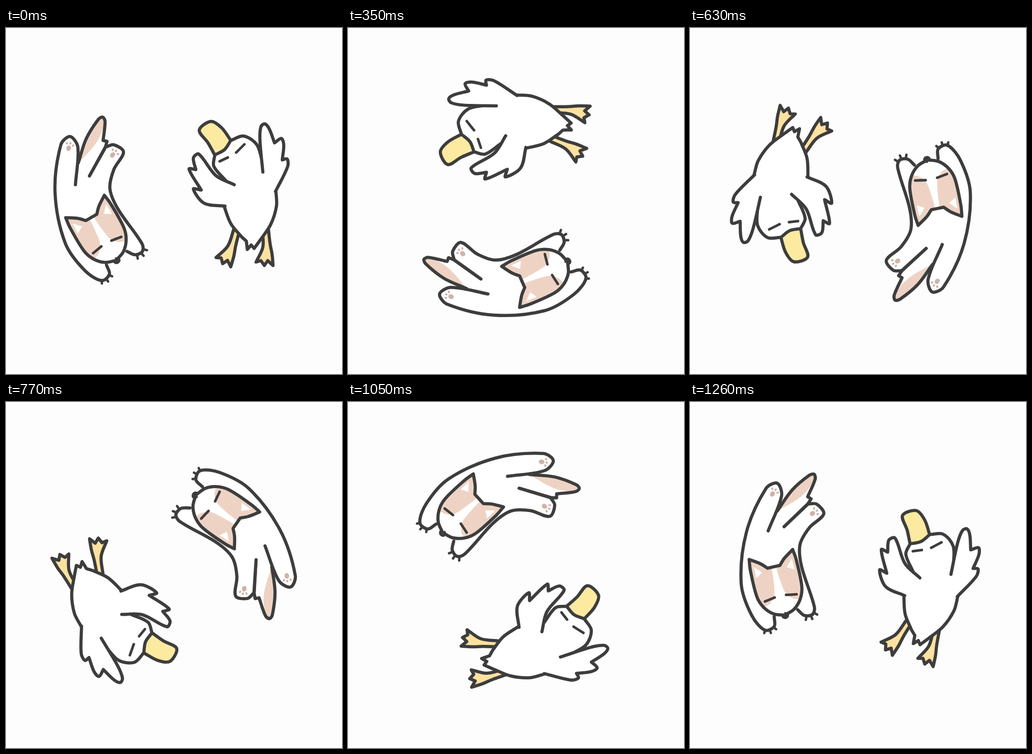
An HTML page that plays this animation: 692x711 px, repeating every 1330 ms.

```html
<!DOCTYPE html>
<html lang="en">
<head>
<meta charset="utf-8">
<title>Spinning cat and duck</title>
<style>
  html, body { margin: 0; width: 100%; height: 100%; overflow: hidden; background: #fdfdfd; }
  svg { display: block; width: 100vw; height: 100vh; }
</style>
</head>
<body>
<svg viewBox="0 0 692 711"><g id="pair" stroke-linecap="round" stroke-linejoin="round"></g></svg>
<script>
const INK = '#3d3d3d', WHITE = '#ffffff', TAN = '#eed3c4', PAD = '#ccb5aa',
      BEAK = '#fdeaa1', FOOT = '#fde1a0', THIN = 5.3, BOLD = 6.5;
const pair = document.getElementById('pair');

function add(parent, tag, attrs) {
  const el = document.createElementNS('http://www.w3.org/2000/svg', tag);
  for (const k in attrs) el.setAttribute(k, attrs[k]);
  return parent.appendChild(el);
}
const place = (x, y, turn, flip = 1) =>
  add(pair, 'g', { transform: `translate(${x} ${y}) rotate(${turn}) scale(${flip} 1)` });

// Smooth path through "x y" points; "/" makes the point before it a sharp corner.
function curve(text) {
  let d = '', last = null;
  for (const part of text.split('/')) {
    const n = part.trim().split(/\s+/).map(Number);
    const p = last ? [last] : [];
    for (let i = 0; i < n.length; i += 2) p.push([n[i], n[i + 1]]);
    if (!last) d = 'M' + p[0];
    const len = (a, b) => Math.hypot(b[0] - a[0], b[1] - a[1]);
    const slope = p.map((q, i) => {
      const a = p[i - 1] || q, b = p[i + 1] || q, l = len(a, q) + len(q, b) || 1;
      return [(b[0] - a[0]) / l, (b[1] - a[1]) / l];
    });
    for (let i = 1; i < p.length; i++) {
      const a = p[i - 1], b = p[i], l = len(a, b) / 3;
      const c1 = a.map((v, k) => v + slope[i - 1][k] * l);
      const c2 = b.map((v, k) => v - slope[i][k] * l);
      d += `C${c1} ${c2} ${b}`;
    }
    last = p[p.length - 1];
  }
  return d;
}

const fill = (text, color, parent = pair) => add(parent, 'path', { d: curve(text), fill: color });
const line = (text, color = 'none', width = BOLD, parent = pair) =>
  add(parent, 'path', { d: curve(text), fill: color, stroke: INK, 'stroke-width': width });
const flat = (points, color, parent = pair) => add(parent, 'polygon', { points, fill: color });
const oval = (parent, cx, cy, rx, ry, color) => add(parent, 'ellipse', { cx, cy, rx, ry, fill: color });

// Paw print: one big pad with three toes fanned around it.
function pads(x, y, turn) {
  oval(place(x, y, turn), 0, 0, 5.8, 4.8, PAD);
  for (const i of [-1, 0, 1]) oval(place(x, y, turn + i * 39), 10.8, 0, 2.8, 2.1, PAD);
}

function claws(x, y, turn) {
  for (const i of [-1, 0, 1]) line('16 0 23 0', 'none', 5, place(x, y, turn + i * 34));
}

// The head is one half, mirrored.
function catHead(x, y, turn) {
  const halves = [1, -1].map(side => place(x, y, turn, side));
  const outline = '0 26 13 26 / 25 14 46 0 / 48.5 22 47.5 78 39 102 22 120 0 128';
  for (const h of halves) {
    fill(outline, WHITE, h);
    fill('4.5 26 13 26 / 25 14 46 0 / 48.5 22 47.5 78 38 103 / 24 98 12 84 7 58 4.5 26', TAN, h);
    flat('40,17.5 40.5,41 26,32.5', WHITE, h);
  }
  for (const h of halves) {
    line(outline, 'none', BOLD, h);
    line('12 88 33.5 91.5', 'none', THIN, h);
  }
  oval(halves[0], 1, 129, 8, 7, INK);
}

function drawCat() {
  const tail = '149 277 165 228 190 188 199 183 204 192 200 231 / 208 233 / 205 244 / 172 304';
  flat('143,322 149,277 205,245 172,304 220,350 249,459 207,487', WHITE);
  fill(tail, WHITE);
  fill('149 278 165 228 198 183 / 203 194 188 233 149 278', TAN);
  line(tail);
  line('143 322 148 245 132 223 113 240 101 338 122 442 162 498 197 519 213 506 207 487', WHITE);
  line('172 304 / 205 245 / 222 240 242 255 222 291 214 330 230 371 280 443 281 459 266 466 249 459', WHITE);
  pads(129, 247, -70);
  pads(219.5, 261, -50);
  claws(197, 502, 55);
  claws(268, 451, 48);
  catHead(162.7, 366.7, -30);
}

function duckFoot(x, y, turn) {
  line('-7 -5 -6 32 -20 63 / -10 60 / -3 70 / 4 60 / 15 70 / 13 47 9 26 5 -8', FOOT, BOLD, place(x, y, turn));
}

function drawDuck() {
  duckFoot(474, 420, 21);
  duckFoot(535, 418, 0);
  flat('430,262 463,231 528,272 529,296 556,336 449,366 440,305', WHITE);
  // body, head, wings, beak, eyes
  line('449 366 463 402 485 429 / 495 438 / 497 455 / 505 446 / 511 453 / 522 438 / 545 404 557 366 556 336', WHITE);
  line('463 231 489 222 516 239 528 274', WHITE);
  line('430 261 428 284 453 314', WHITE);
  line('470 322 432 303 397 259 386 267 391 291 / 377 290 402 333 / 386 331 408 360 451 366', WHITE);
  line('529 296 523 230 525 203 533 197 542 207 553 236 / 567 227 572 240 569 271 / 579 269 580 285 555 336', WHITE);
  line('463 231 444 205 422 192 398 210 416 236 430 261 / 450 250 463 231', BEAK);
  line('440 274 457 266', 'none', THIN);
  line('474 256 491 239', 'none', THIN);
}

// Counter-clockwise turn in degrees at a few steps of the spin, eased between.
const STEP = 70, STEPS = 19;
const keys = [[0, 0], [2, 31], [5, 83.6], [9, 161.6], [11, 205.5], [15, 282.5], [18, 342.8]];

function key(i) {
  const lap = Math.floor(i / keys.length), [s, a] = keys[i - lap * keys.length];
  return [s + lap * STEPS, a + lap * 360];
}

function turnAt(step) {
  let i = 0;
  while (key(i + 1)[0] <= step) i++;
  const [a, b, c, d] = [-1, 0, 1, 2].map(k => key(i + k));
  const span = c[0] - b[0], u = (step - b[0]) / span, v = 1 - u;
  const m0 = (c[1] - a[1]) / (c[0] - a[0]) * span;
  const m1 = (d[1] - b[1]) / (d[0] - b[0]) * span;
  return v * v * ((1 + 2 * u) * b[1] + u * m0) + u * u * ((1 + 2 * v) * c[1] - v * m1);
}

function render(ms) {
  const step = Math.floor(ms / STEP) % STEPS;
  pair.setAttribute('transform', `rotate(${-turnAt(step)} 341.2 353)`);
}

drawCat();
drawDuck();

let start = null;
function tick(now) {
  if (start === null) start = now;
  render(now - start);
  requestAnimationFrame(tick);
}
render(0);
requestAnimationFrame(tick);
</script>
</body>
</html>
```
